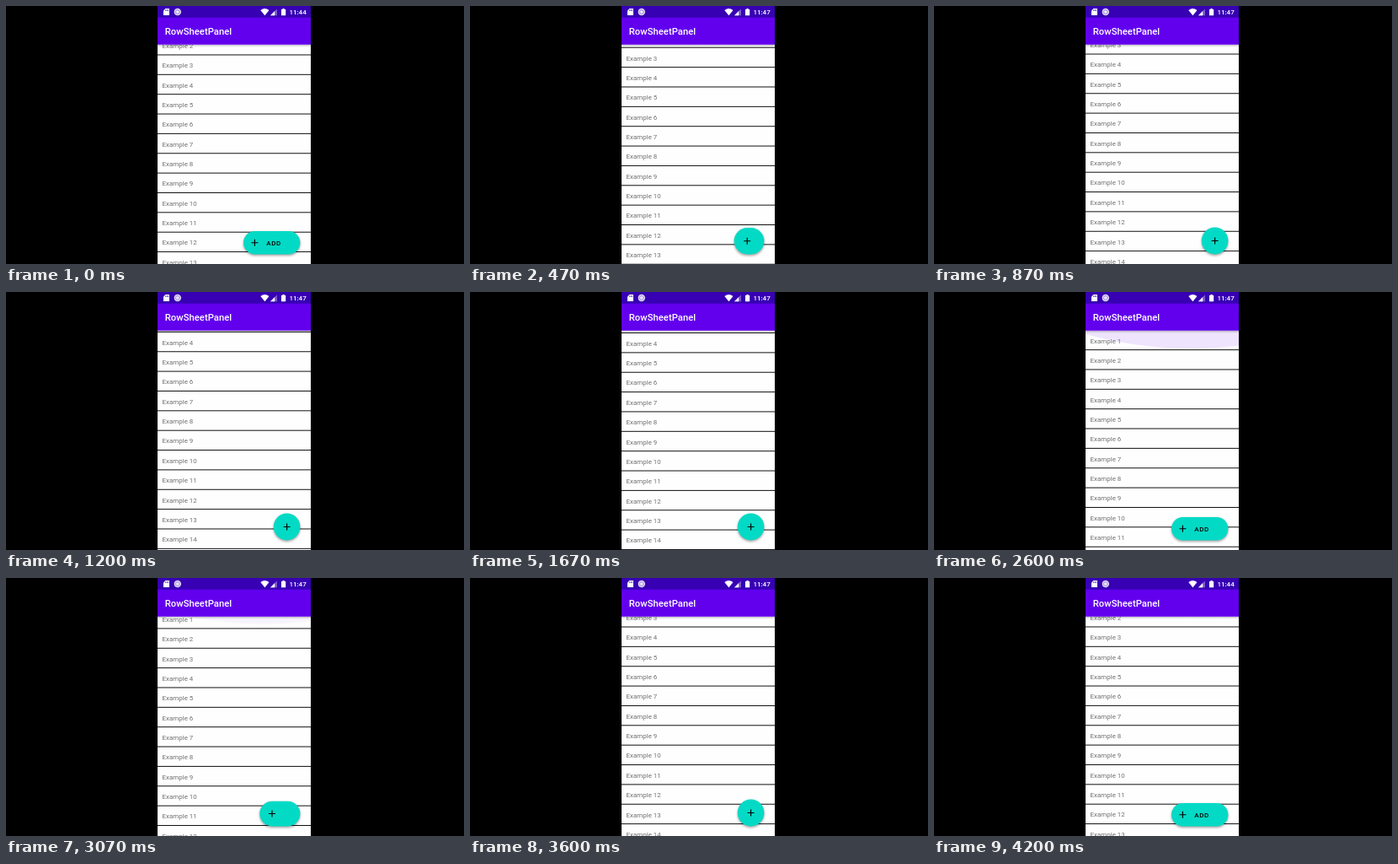
Recreate the animation shown at these times as an HTML page. Size 544 px wide and 306 px high, loop 5070 ms.

```html
<!DOCTYPE html>
<html lang="en">
<head>
<meta charset="utf-8">
<title>Expanding button over a list</title>
<style>
  html, body { margin: 0; width: 100%; height: 100%; overflow: hidden; background: #000; }
  svg { display: block; width: 100vw; height: 100vh; }
  text { font-family: Roboto, sans-serif; }
  .row { font-size: 7.96px; fill: #707070; }
  .title { font-size: 11.3px; font-weight: 500; fill: #fff; }
  .clock { font-size: 8px; font-weight: 500; fill: #fff; }
  .label { font-size: 7.96px; font-weight: 500; letter-spacing: .71px; fill: #000; }
</style>
</head>
<body>
<svg viewBox="0 0 544 306">
  <defs>
    <clipPath id="view"><rect x="180" y="45.8" width="182" height="260.2"/></clipPath>
    <linearGradient id="shade" x1="0" y1="0" x2="0" y2="1">
      <stop offset="0" stop-color="#000" stop-opacity=".24"/>
      <stop offset="1" stop-color="#000" stop-opacity="0"/>
    </linearGradient>
    <filter id="soft" x="-30%" y="-40%" width="160%" height="180%">
      <feGaussianBlur stdDeviation="1.7"/>
    </filter>
  </defs>
  <rect width="544" height="306"/>
  <rect x="180" width="182" height="306" fill="#fefefe"/>

  <g clip-path="url(#view)">
    <g id="list"></g>
    <circle id="glow" cx="305" r="468" fill="#6200ee"/>
    <rect x="180" y="45.8" width="182" height="3" fill="url(#shade)"/>
  </g>

  <rect x="180" width="182" height="14" fill="#3700b3"/>
  <rect x="180" y="13.7" width="182" height="32.1" fill="#6200ee"/>
  <text class="title" x="188.8" y="34">RowSheetPanel</text>

  <!-- status icons -->
  <path d="M189.4 3H194V11H187V5.4Z" fill="#fff"/>
  <path d="M189.7 4.2V6M191.2 4.2V6M192.7 4.2V6" stroke="#3700b3" stroke-width=".7"/>
  <circle cx="203.8" cy="7" r="3.7" fill="#a994dd" stroke="#fff" stroke-width="1"/>
  <circle cx="203.8" cy="7" r="1.9" fill="#e9e3f7"/>
  <path d="M302.3 4.9Q307.4 1.2 312.5 4.9L307.4 11.2Z" fill="#fff"/>
  <path d="M314 11.2L322 3.2V11.2Z" fill="#fff" opacity=".35"/>
  <path d="M314 11.2L319.2 6V11.2Z" fill="#fff"/>
  <path d="M327 3.9H328.4V3H330.8V3.9H332.2V11.2H327Z" fill="#fff"/>
  <text class="clock" id="clock" x="336.4" y="10"></text>

  <rect id="shadow" fill="#000" opacity=".38" filter="url(#soft)"/>
  <rect id="fab" fill="#03dac5"/>
  <path id="plus" d="M-4 0H4M0 -4V4" stroke="#000" stroke-width="1.15"/>
  <text class="label" id="label" x="309.2" y="283.6">ADD</text>
</svg>
<script>
const LOOP = 5070, STEP = 200 / 3, PITCH = 23.36, ROWS = 16;
const RIGHT = 349.4, BOTTOM = 294.4;
const $ = id => document.getElementById(id);
const set = (el, attrs) => {
  for (const key in attrs) el.setAttribute(key, attrs[key]);
};
const lerp = (a, b, u) => a + (b - a) * u;
const ramp = (x, from, to) => Math.min(1, Math.max(0, (x - from) / (to - from)));
const ease = u => u * u * (3 - 2 * u);

// [step, scroll offset]
const scrollKeys = [
  [0, 34], [3, 34], [5, 37], [9, 49], [13, 58.3], [16, 65], [19, 68.5],
  [24, 68.5], [25, 66.8], [27, 55], [31, 19], [35, 0],
  [43, 0], [46, 8.7], [50, 40], [54, 57.3], [58, 57.36], [62, 57.36]
];

// monotone cubic through the keys
function curve(keys) {
  const slope = i => (keys[i + 1][1] - keys[i][1]) / (keys[i + 1][0] - keys[i][0]);
  const tangent = i => {
    if (i === 0 || i === keys.length - 1) return 0;
    const a = slope(i - 1), b = slope(i);
    return a * b > 0 ? 2 * a * b / (a + b) : 0;
  };
  return x => {
    let i = 0;
    while (i < keys.length - 2 && x >= keys[i + 1][0]) i++;
    const [x0, y0] = keys[i], [x1, y1] = keys[i + 1];
    const w = x1 - x0, u = ramp(x, x0, x1), v = 1 - u;
    return lerp(y0, y1, ease(u)) + w * u * v * (v * tangent(i) - u * tangent(i + 1));
  };
}
const scrollAt = curve(scrollKeys);

let rows = "";
for (let i = 0; i < ROWS; i++) {
  const y = i * PITCH;
  rows += `<text class="row" x="185.5" y="${60.5 + y}">Example ${i + 1}</text>` +
    `<rect x="180" y="${68.1 + y}" width="182" height="1" fill="#111"/>`;
}
$("list").innerHTML = rows;

// 0 = round button, 1 = pill with label
function openness(k) {
  if (k < 20) return 1 - ease(ramp(k, 4, 7.8));
  if (k < 42) return ease(ramp(k, 26, 30));
  return 1 - ease(ramp(k, 44, 47.8));
}

function drawFab(open) {
  const w = lerp(31.6, 67.4, open), h = lerp(31.8, 27.4, open);
  const x = RIGHT - w, y = BOTTOM - h;
  const box = { x, width: w, height: h, rx: h / 2 };
  set($("fab"), { ...box, y });
  set($("shadow"), { ...box, y: y + 1.6 });
  set($("plus"), { transform: `translate(${x + lerp(15.8, 13.4, open)} ${y + h / 2})` });
  set($("label"), { opacity: ramp(open, .65, 1) });
}

function draw(ms) {
  const k = Math.floor((ms + 3.4) / STEP);
  const idle = k < 4 || k >= 62;
  set($("list"), { transform: `translate(0 ${-(idle ? 34 : scrollAt(k))})` });
  $("clock").textContent = idle ? "11:44" : "11:47";

  const pull = k < 42 ? ease(ramp(k, 34, 39)) : 1 - ramp(k, 43, 48);
  set($("glow"), { cy: 46 + 21 * pull - 468, opacity: .1 * pull });
  drawFab(idle ? 1 : openness(k));
}

const start = performance.now();
function tick() {
  draw((performance.now() - start) % LOOP);
  requestAnimationFrame(tick);
}
tick();
</script>
</body>
</html>
```
